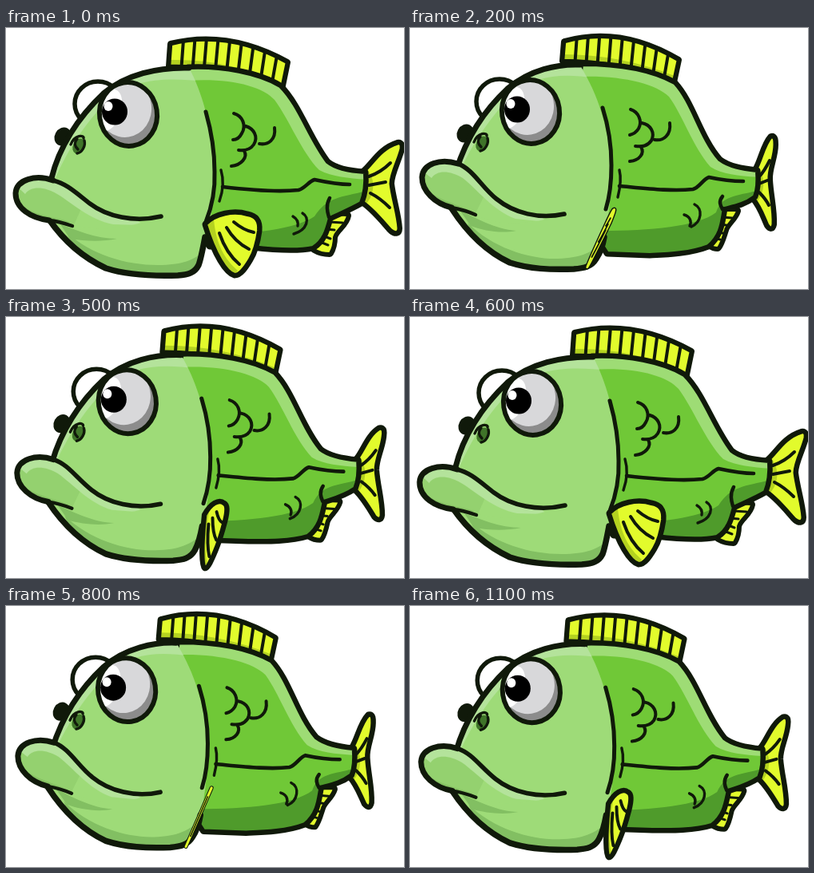
Animation of 498 by 327 pixels, one loop 1.2 s. Source, as an HTML page with a canvas:

```html
<!DOCTYPE html>
<html lang="en">
<head>
<meta charset="utf-8">
<title>Swimming fish</title>
<style>
html, body { margin: 0; width: 100%; height: 100%; overflow: hidden; background: #fff; }
canvas { display: block; }
</style>
</head>
<body>
<canvas id="c" width="498" height="327"></canvas>
<script>
const ctx = document.getElementById('c').getContext('2d');
const INK = '#10190a', YELLOW = '#e2fb2c', LIME = '#b4d220';
const HEAD = '#9edb78', HEAD_LIGHT = '#b4e39b', HEAD_DARK = '#82bf62';
const BODY = '#70c837', BODY_LIGHT = '#9edc75', BODY_DARK = '#4f9b2b';
const LIP = '#94d16f';

// Stretch of the body at each step: 1 = turned sideways, 0 = tail swung away.
const STEP = 100;
const SWING = [1, .41, 0, -.12, -.02, .41, 1, .41, .05, -.12, -.05, .41];
let s = 1;

const mix = (a, b) => b + (a - b) * s;

// Blends two path strings that share one structure.
function blend(long, short) {
  const nums = short.match(/-?[\d.]+/g);
  let i = 0;
  return new Path2D(long.replace(/-?[\d.]+/g, n => mix(+n, +nums[i++])));
}

function fill(path, color) {
  ctx.fillStyle = color;
  ctx.fill(path);
}

function line(path, w = 5, color = INK) {
  ctx.strokeStyle = color;
  ctx.lineWidth = w;
  ctx.stroke(path);
}

function within(path, paint) {
  ctx.save();
  ctx.clip(path);
  paint();
  ctx.restore();
}

function oval(x, y, rx, ry, turn = 0) {
  const p = new Path2D();
  p.ellipse(x, y, rx, ry, turn, 0, Math.PI * 2);
  return p;
}

function tail() {
  const p = blend(
    'M448 180 C460 170 468 152 490 145 C495 144 495 149 493 155 C489 169 481 183 481 195 C483 213 490 234 491 251 C491 257 487 257 482 253 C472 242 458 224 444 216 Z',
    'M433 178 C440 167 443 147 452 137 C456 136 456 141 456 146 C456 162 448 176 449 190 C450 210 455 228 454 246 C453 251 451 251 448 247 C443 236 439 223 430 213 Z');
  line(p, 10);
  fill(p, YELLOW);
  within(p, () => line(blend('M447 178 C458 190 458 208 444 221', 'M432 176 C440 188 440 204 430 216'), 9, LIME));
  line(p, 3);
  line(blend('M454 186 C463 183 474 176 481 169 M454 197 L475 193 M456 207 C464 211 473 218 480 225',
    'M437 186 C442 181 446 174 450 166 M437 195 L447 191 M437 206 C441 210 446 216 449 222'), 4);
}

function analFin() {
  const p = blend(
    'M403 234 L427 235 C425 247 412 253 410 262 C410 270 408 277 405 282 C397 282 391 280 386 277 C390 269 391 265 392 260 C397 252 401 244 403 234 Z',
    'M390 229 L409 229 C406 239 396 245 394 253 C391 262 389 270 385 275 C380 275 377 273 374 271 C377 264 378 260 379 255 C383 247 388 239 390 229 Z');
  line(p, 10);
  fill(p, YELLOW);
  line(p, 2);
  line(blend('M405 243 L421 244 M400 252 L411 253 M396 260 L406 264 M393 268 L403 272',
    'M391 237 L403 238 M387 246 L396 247 M383 255 L391 257 M380 263 L388 265'), 3);
}

function quad(p, t) {
  const a = (1 - t) ** 2, b = 2 * t * (1 - t), c = t * t;
  return [a * p[0] + b * p[2] + c * p[4], a * p[1] + b * p[3] + c * p[5]];
}

function dorsalFin() {
  const both = (a, b) => a.map((v, i) => mix(v, b[i]));
  const top = both([206, 20, 278, 2, 352, 43], [193, 17, 264, -3, 336, 40]);
  const low = both([204, 48, 275, 46, 345, 77], [191, 41, 262, 41, 330, 68]);
  const p = new Path2D();
  p.moveTo(low[0], low[1]);
  p.lineTo(top[0], top[1]);
  p.quadraticCurveTo(...top.slice(2));
  p.lineTo(low[4], low[5]);
  p.quadraticCurveTo(low[2], low[3], low[0], low[1]);
  line(p, 8);
  fill(p, YELLOW);
  within(p, () => {
    const base = new Path2D();
    base.moveTo(low[0], low[1] - 2);
    base.quadraticCurveTo(low[2], low[3] - 2, low[4], low[5] - 2);
    line(base, 12, LIME);
  });
  line(p, 4.5);
  const spines = new Path2D();
  for (let i = 1; i < 10; i++) {
    spines.moveTo(...quad(top, i / 10 + .01));
    spines.lineTo(...quad(low, i / 10 + .01));
  }
  line(spines, 4);
}

function body() {
  const p = blend(
    'M228 50 C270 48 317 57 343 73 C367 97 379 138 402 168 C413 177 430 180 449 181 C450 195 449 206 444 219 C430 227 415 233 405 238 C401 254 397 267 384 275 C360 280 325 276 308 274 L255 273 L205 200 Z',
    'M215 46 C260 46 302 53 331 69 C354 94 362 136 387 165 C399 174 415 177 434 179 C435 192 434 204 431 211 C418 221 405 223 393 226 C390 241 390 259 373 273 C350 282 320 283 300 284 L247 282 L195 200 Z');
  line(p, 9);
  fill(p, BODY);
  within(p, () => {
    fill(blend(
      'M225 66 C280 62 321 73 336 90 C354 114 370 156 392 178 C409 187 430 188 452 190 L452 160 L350 40 L225 40 Z',
      'M212 61 C264 59 308 70 324 86 C341 109 354 149 376 174 C391 184 412 185 437 187 L437 155 L340 40 L212 35 Z'), BODY_LIGHT);
    fill(blend(
      'M250 259 C310 258 362 252 386 236 C402 211 420 212 452 204 L452 290 L250 290 Z',
      'M240 254 C300 254 360 249 383 231 C390 209 410 211 437 203 L437 292 L240 292 Z'), BODY_DARK);
  });
  line(p, 4);
  line(blend('M269 178 C272 188 273 200 267 217', 'M262 178 C264 186 264 196 260 212'), 3.4);
  line(blend('M271 199 C305 203 338 206 366 203 C374 201 379 192 386 190 C400 193 415 196 430 196',
    'M262 198 C295 201 328 205 354 202 C362 200 367 189 374 187 C388 190 402 192 417 192'), 4.6);
  line(blend('M405 213 C400 222 402 230 404 237', 'M391 211 C386 217 388 222 391 227'), 4.5);
  line(blend(
    'M285 107 C296 110 301 122 295 132 C292 138 288 140 284 140 M300 123 C310 126 316 136 310 146 C306 152 300 154 291 153 M317 145 C328 147 338 140 336 125 M298 154 C303 162 294 172 282 173',
    'M276 102 C286 105 291 117 286 126 C283 131 279 133 275 134 M290 119 C301 121 307 131 302 141 C297 148 291 149 282 148 M306 140 C317 142 327 134 325 119 M289 149 C294 157 287 166 275 167'), 4);
  line(blend('M371 232 C381 238 377 253 360 258 M359 236 C364 239 366 243 365 248',
    'M356 221 C367 226 365 243 352 249 M343 234 C350 236 353 242 350 248'), 3.4);
}

function farSide() {
  fill(oval(mix(71, 69), mix(136, 132), 10, 12, .5), INK);
  const x = mix(115, 112), y = mix(95, 92);
  const p = oval(x, y, 29, 28);
  fill(p, '#fff');
  within(p, () => fill(oval(x + 19, y + 17, 23, 24), '#c5c5cf'));
  line(p, 5.5);
}

function head() {
  const p = blend(
    'M57 188 C66 150 90 112 122 82 C150 58 190 49 229 50 C243 75 259 125 261 175 C262 225 250 270 241 297 C236 307 228 309 215 310 C185 311 150 309 125 301 C95 287 72 266 54 240 Z',
    'M58 178 C70 140 92 104 122 76 C150 52 185 45 212 46 C229 72 248 116 251 168 C253 215 247 260 233 289 C227 299 218 301 205 302 C175 303 150 302 125 294 C95 280 72 257 52 226 Z');
  fill(p, HEAD);
  within(p, () => {
    fill(blend('M62 188 C78 150 104 112 132 87 C160 65 195 61 250 67 L230 35 L110 50 L45 150 Z',
      'M64 176 C82 138 106 104 132 81 C158 60 188 56 232 63 L212 30 L105 45 L45 140 Z'), HEAD_LIGHT);
    fill(blend('M76 256 C106 284 150 297 190 297 C220 297 235 291 250 278 L245 320 L100 320 Z',
      'M72 244 C104 276 150 290 185 289 C214 288 230 281 246 264 L240 315 L95 315 Z'), HEAD_DARK);
    fill(blend('M68 246 C88 253 112 264 139 264 C120 268 98 267 80 264 Z',
      'M62 228 C82 238 106 252 133 254 C114 258 92 254 76 248 Z'), HEAD_DARK);
  });
  line(blend('M57 188 C66 150 90 112 122 82 C150 58 190 49 229 50',
    'M58 178 C70 140 92 104 122 76 C150 52 185 45 212 46'), 7);
  line(blend('M249 262 C246 278 244 289 241 297 C236 307 228 309 215 310 C185 311 150 309 125 301 C95 287 72 266 54 240',
    'M243 262 C241 274 238 282 233 289 C227 299 218 301 205 302 C175 303 150 302 125 294 C95 280 72 257 52 226'), 7.5);
  line(blend('M250 105 C256 126 261 154 261 180 C262 205 256 228 250 243',
    'M241 100 C248 122 252 148 252 172 C252 196 249 214 245 227'), 5);
  const nx = mix(91, 90), ny = mix(148, 145);
  fill(oval(nx, ny, 7, 10, .45), '#3f7429');
  line(new Path2D(`M${nx - 10} ${ny - 2} C${nx - 5} ${ny - 15} ${nx + 7} ${ny - 14} ${nx + 6} ${ny - 10} M${nx + 7} ${ny - 7} C${nx + 9} ${ny} ${nx + 4} ${ny + 8} ${nx - 2} ${ny + 9} M${nx - 2} ${ny - 9} C${nx - 7} ${ny - 3} ${nx - 4} ${ny + 1} ${nx - 1} ${ny + 4}`), 3.4);
}

function lip() {
  const p = blend(
    'M59 191 C37 183 13 190 12 207 C12 226 31 238 54 241 C76 244 96 251 116 252 C145 252 174 243 194 236 C160 244 126 236 105 220 C88 207 76 195 59 191 Z',
    'M60 170 C38 163 16 170 15 187 C15 204 31 220 52 225 C74 230 92 241 114 244 C145 247 172 240 192 233 C162 240 130 232 108 214 C90 200 79 177 60 170 Z');
  fill(p, HEAD);
  within(p, () => {
    fill(blend('M0 180 L70 180 L96 222 L84 249 L0 249 Z', 'M0 160 L72 160 L94 208 L80 236 L0 236 Z'), LIP);
    fill(blend('M24 208 C30 198 48 198 64 208 C84 220 104 240 134 246 L172 247 L110 200 L50 180 L10 195 Z',
      'M27 188 C33 178 50 178 66 188 C84 202 104 229 132 239 L172 243 L110 195 L50 160 L10 175 Z'), HEAD_LIGHT);
    fill(blend('M20 222 C36 235 58 236 80 243 L60 254 L10 240 Z',
      'M21 202 C36 216 58 220 78 230 L58 240 L10 220 Z'), '#86c263');
  });
  line(blend('M194 236 C160 244 126 236 105 220 C88 207 76 195 59 191',
    'M193 233 C162 240 130 232 108 214 C90 200 79 177 60 170'), 5.6);
  line(blend('M59 191 C37 183 13 190 12 207 C12 226 31 238 54 241', 'M60 170 C38 163 16 170 15 187 C15 204 31 220 52 225'), 7);
  line(blend('M54 241 C65 242 74 245 83 248', 'M52 225 C63 227 73 230 82 234'), 4.4);
}

function eye() {
  const x = mix(153, 151), y = mix(108, 105);
  const p = oval(x, y, 36, 40, -.15);
  fill(p, '#8c8c8c');
  within(p, () => {
    fill(oval(x - 5, y - 8, 34, 37, -.15), '#d8d8da');
    fill(oval(x - 24, y - 5, 15, 27, .3), '#fff');
  });
  line(p, 6);
  fill(oval(x - 17, y - 3, 16, 16.5), '#000');
  fill(oval(x - 25, y - 10, 5.5, 6), '#fff');
}

// Fin frame: stretch, origin, width vector, length vector.
const FIN = [
  [1, [250, 243], [68, -3], [40, 69]],
  [.41, [250, 245], [27, -5], [0, 72]],
  [.05, [251, 242], [4, -9], [-27, 62]]
];
const frame = (o, x, t) => new DOMMatrix([x[0], x[1], t[0], t[1], o[0], o[1]]);
const REST = frame(...FIN[0].slice(1)).inverse();
const FIN_SHAPE = 'M250 246 C262 233 285 229 302 234 C313 236 317 242 316 254 C314 268 311 280 305 290 C299 300 293 309 286 309 C276 306 262 285 250 246 Z';
const FIN_SHADE = 'M250 246 C262 285 276 306 286 309 L290 304 C274 290 263 272 260 240 Z';
const FIN_LINES = 'M267 257 C272 272 280 286 292 296 M276 250 C283 262 292 271 304 277 M285 243 C292 249 300 254 310 256';

function pectoralFin() {
  const [a, b] = s > .41 ? [FIN[0], FIN[1]] : [FIN[1], FIN[2]];
  const k = (s - a[0]) / (b[0] - a[0]);
  const [o, x, t] = [1, 2, 3].map(i => a[i].map((v, j) => v + (b[i][j] - v) * k));
  const m = frame(o, x, t).multiply(REST);
  const place = d => {
    const p = new Path2D();
    p.addPath(new Path2D(d), m);
    return p;
  };
  const open = Math.min(1, Math.abs(x[0] * t[1] - x[1] * t[0]) / 2000);
  const p = place(FIN_SHAPE);
  line(p, 5 + 4 * open);
  if (open < 1) line(p, 3 * (1 - open), YELLOW);
  fill(p, YELLOW);
  fill(place(FIN_SHADE), LIME);
  if (open > .5) line(p, 4 * open);
  line(place(FIN_LINES), 1.4 + 2.6 * open);
}

function draw() {
  const step = Math.floor(performance.now() / STEP) % SWING.length;
  s = SWING[step];
  ctx.fillStyle = '#fff';
  ctx.fillRect(0, 0, 498, 327);
  ctx.lineCap = ctx.lineJoin = 'round';
  tail();
  analFin();
  dorsalFin();
  body();
  farSide();
  head();
  lip();
  eye();
  pectoralFin();
  requestAnimationFrame(draw);
}
draw();
</script>
</body>
</html>
```
